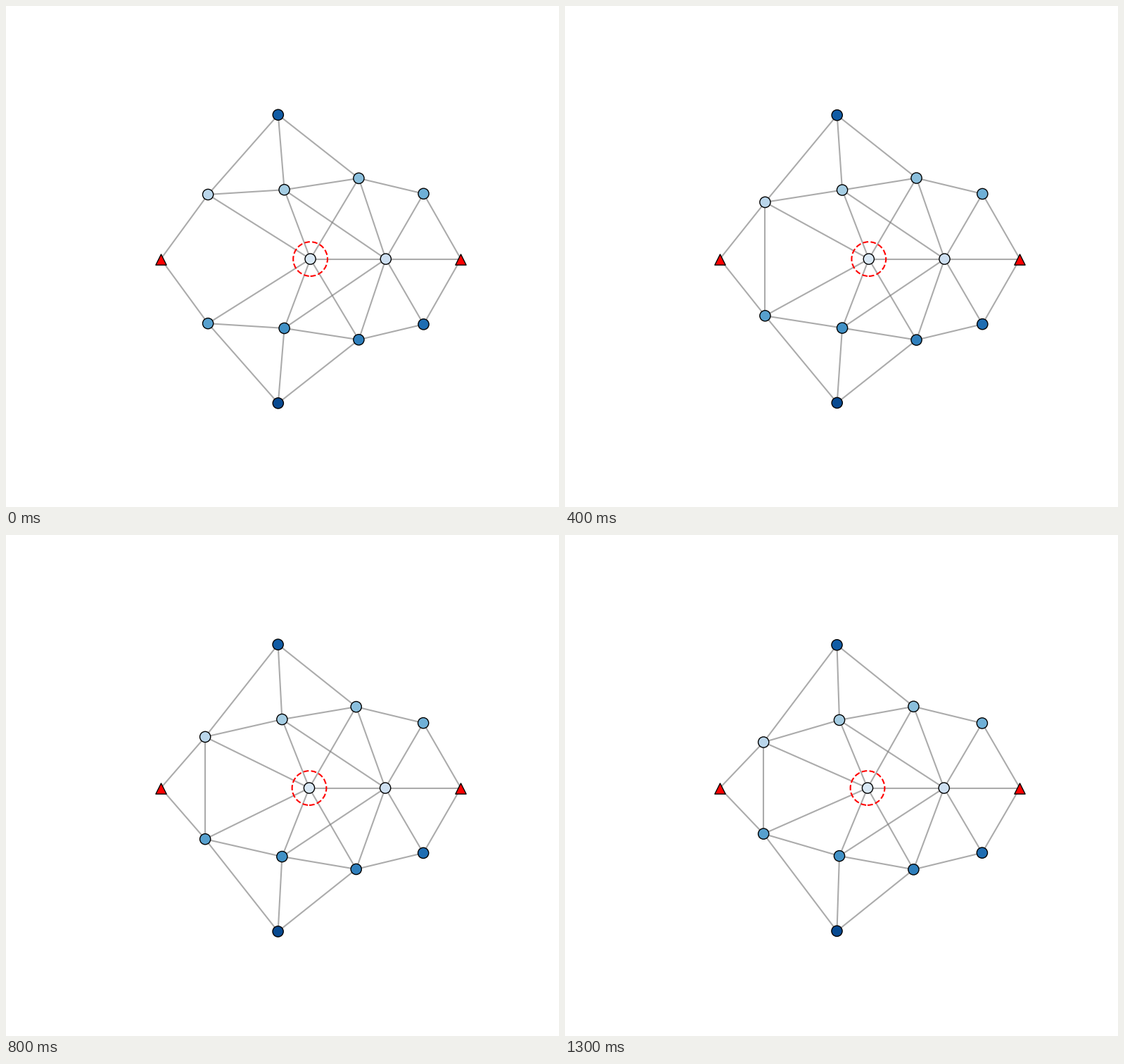
Animation of 786x712 px, one loop 1350 ms. Source, as a matplotlib script:

```python
from itertools import combinations

import matplotlib.pyplot as plt
import numpy as np
from matplotlib.animation import FuncAnimation
from matplotlib.collections import LineCollection
from matplotlib.patches import Circle

W, H, DPI = 786, 712, 100
FRAMES, INTERVAL = 27, 50
UNIT = 60.915            # pixels per world unit
MID = H - 359.56         # axis of symmetry, y up
REACH = 3 * UNIT         # nodes closer than this are linked
ANCHORS = [(220.08, MID), (646.48, MID)]

# x start, x end, x bend, then the same for the distance from the axis
HUB = (432.6, 430.0, 0, 0, 0, 0)
EAST = (539.8, 538.7, 0, 0, 0, 0)
WEST = (287.1, 282.2, 1.67, 91.6, 65.1, 0.57)
INNER = (395.6, 390.0, -0.15, 98.4, 96.6, -0.4)
SHOULDER = (501.4, 495.4, 0, 114.7, 115.8, 0)
OUTER = (593.5, 592.9, 0, 92.8, 92.1, 0)
PEAK = (386.8, 386.5, 0, 204.9, 203.3, 0)

# Path and side of the axis, from the lightest node to the darkest
NODES = [(HUB, 1), (EAST, 1), (WEST, 1), (INNER, 1), (SHOULDER, 1), (OUTER, 1),
         (WEST, -1), (INNER, -1), (SHOULDER, -1), (OUTER, -1),
         (PEAK, 1), (PEAK, -1)]


def ease(start, end, bend, u):
    """Positive bend starts fast and slows down, zero is linear."""
    return start + (end - start) * (1 + bend) * u / (1 + bend * u)


def positions(u):
    return np.array([(ease(*path[:3], u), MID + side * ease(*path[3:], u))
                     for path, side in NODES])


def links(points):
    return [(a, b) for a, b in combinations(points, 2)
            if np.hypot(b[0] - a[0], b[1] - a[1]) < REACH]


fig = plt.figure(figsize=(W / DPI, H / DPI), dpi=DPI, facecolor="white")
ax = fig.add_axes([0, 0, 1, 1])
ax.set_xlim(0, W)
ax.set_ylim(0, H)
ax.axis("off")

start = positions(0)
edges = LineCollection([], colors="gray", linewidths=1.5, alpha=0.66, zorder=1)
ax.add_collection(edges)
ring = Circle(start[0], 0.4 * UNIT, fill=False, edgecolor="red",
              linewidth=1.5, linestyle="--", zorder=2)
ax.add_patch(ring)
shades = plt.cm.Blues(np.linspace(0.15, 0.9, len(NODES)))
dots = ax.scatter(*start.T, s=120, c=shades, edgecolors="black",
                  linewidths=1, zorder=3)
ax.scatter(*zip(*ANCHORS), s=120, marker="^", c="red", edgecolors="black",
           linewidths=1, zorder=3)


def draw(i):
    points = positions(i / (FRAMES - 1))
    edges.set_segments(links([*points, *ANCHORS]))
    dots.set_offsets(points)
    ring.center = tuple(points[0])
    return edges, ring, dots


anim = FuncAnimation(fig, draw, frames=FRAMES, interval=INTERVAL,
                     repeat=True, repeat_delay=0)
plt.show()
```
